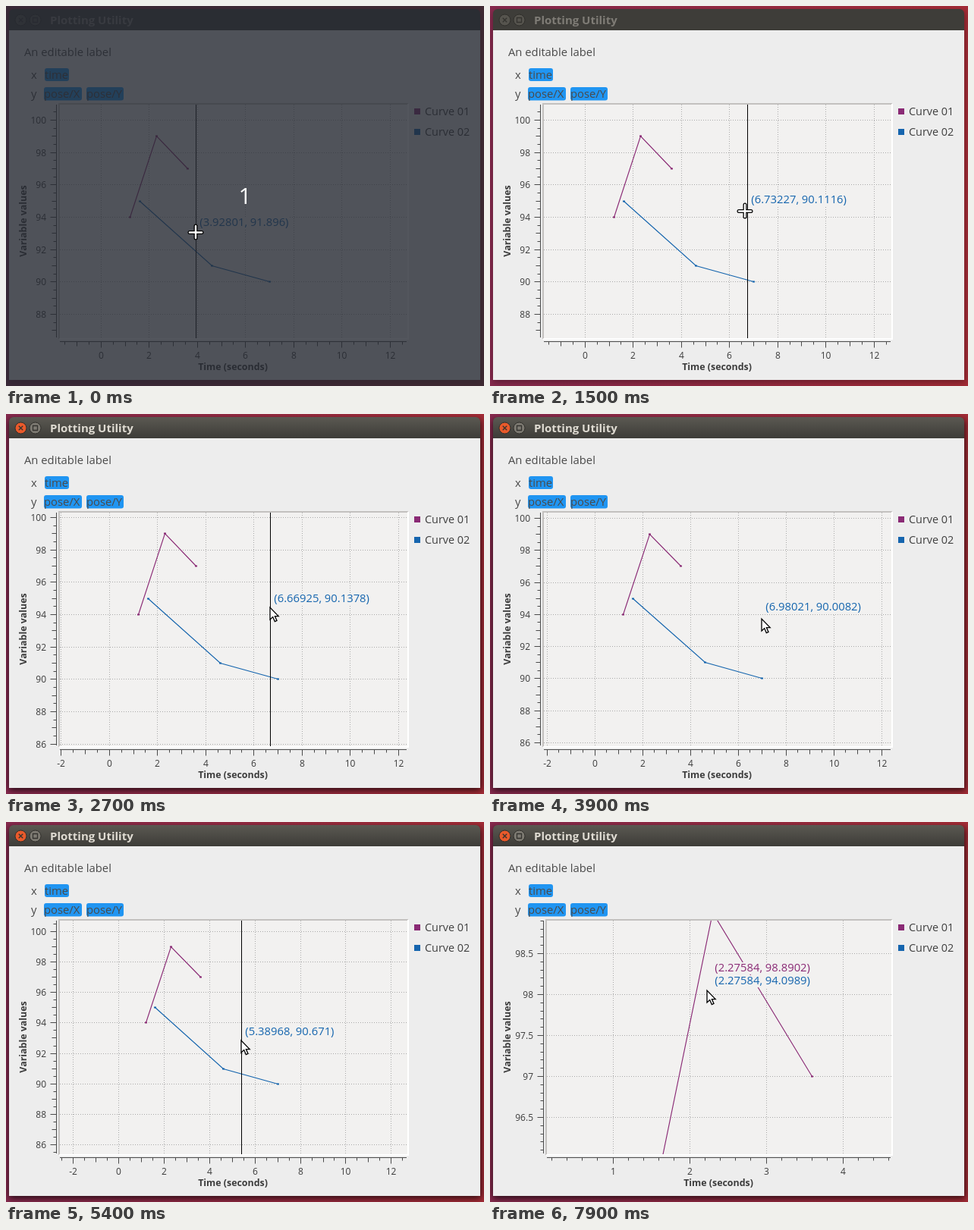
An HTML page with a canvas for the animation above (8000 ms loop, 630 by 501 pixels).

```html
<!DOCTYPE html>
<html lang="en">
<head>
<meta charset="utf-8">
<title>Plotting Utility</title>
<style>
  html, body { margin: 0; width: 100%; height: 100%; overflow: hidden; background: #8a2a4c; }
  svg, canvas { position: absolute; left: 0; top: 0; width: 630px; height: 501px; display: block; }
  text { font: 14.8px "Open Sans", "Noto Sans", sans-serif; fill: #4a4a4a; }
  .title { font-weight: 700; font-size: 15px; fill: #7f7c76; }
  .legend text { font-size: 14.4px; fill: #3f3f3f; }
  .axis { font-weight: 700; font-size: 12.4px; fill: #3c3c3c; text-anchor: middle; }
  .chip { fill: #2095f2; }
  .bar { fill: #3e3d39; }
  .shadow { opacity: .35; }
  .button { fill: #56544e; stroke: #2f2e2a; }
  .mark { fill: none; stroke: #34332f; stroke-width: 1.3; }
  .focused .title { fill: #dfdbd2; }
  .focused .bar { fill: url(#bar); }
  .focused .shadow { opacity: .75; }
  .focused .button { fill: #7d7a72; }
  .focused .close { fill: #e95a2b; }
</style>
</head>
<body>
<svg id="win" viewBox="0 0 630 501">
  <defs>
    <linearGradient id="desk">
      <stop offset="0" stop-color="#872a4e"/><stop offset="1" stop-color="#a42c36"/>
    </linearGradient>
    <linearGradient id="bar" x2="0" y2="1">
      <stop offset="0" stop-color="#5b5952"/><stop offset="1" stop-color="#3d3c38"/>
    </linearGradient>
    <filter id="blur"><feGaussianBlur stdDeviation="5"/></filter>
  </defs>
  <rect width="630" height="501" fill="url(#desk)"/>
  <rect class="shadow" x="4" y="8" width="622" height="488" filter="url(#blur)"/>
  <path class="bar" d="M4 32V10a6 6 0 0 1 6-6h609a6 6 0 0 1 6 6v22z"/>
  <rect x="4" y="32" width="621" height="461" fill="#ededed"/>
  <circle class="button close" cx="19.5" cy="18.5" r="7.5"/>
  <path class="mark" d="M16.8 15.8l5.4 5.4m0-5.4l-5.4 5.4"/>
  <circle class="button" cx="38.5" cy="18.5" r="7.5"/>
  <path class="mark" d="M35.5 15.5h6v6h-6z"/>
  <text class="title" x="58" y="24">Plotting Utility</text>
  <text x="24" y="66">An editable label</text>
  <rect class="chip" x="51" y="82" width="32" height="17" rx="3"/>
  <rect class="chip" x="50" y="107" width="50" height="17.5" rx="3"/>
  <rect class="chip" x="106" y="107" width="49" height="17.5" rx="3"/>
  <text x="33" y="96">x</text><text x="51" y="96">time</text>
  <text x="33" y="121">y</text><text x="50" y="121">pose/X</text><text x="106" y="121">pose/Y</text>
  <g class="legend">
    <rect x="538" y="135" width="8" height="8" fill="#8a2a75"/>
    <rect x="538" y="162" width="8" height="8" fill="#1565ae"/>
    <text x="552" y="144">Curve 01</text><text x="552" y="171">Curve 02</text>
  </g>
  <text class="axis" transform="translate(27 283.5) rotate(-90)">Variable values</text>
  <text class="axis" id="xTitle" x="299" y="480">Time (seconds)</text>
</svg>
<canvas id="plot" width="630" height="501"></canvas>
<script>
const LOOP = 8000, STEP = 100;
const TOP = 130, BOTTOM = 438, RIGHT = 529;
const FONT = '"Open Sans", "Noto Sans", sans-serif';
const win = document.getElementById('win');
const xTitle = document.getElementById('xTitle');
const ctx = document.getElementById('plot').getContext('2d');

const curves = [
  { color: '#8a2a75', pts: [[1.2, 94], [2.3, 99], [3.6, 97]] },
  { color: '#1565ae', pts: [[1.6, 95], [4.6, 91], [7, 90]] }
];

// time, pointer x, y, tracker x, y
const path = [
  [200, 250, 298, 250, 298], [800, 300, 283, 300, 283], [1300, 345, 268, 345, 268],
  [1500, 336, 270, 339, 268], [1700, 337, 269, 337, 269], [2700, 348, 255, 348, 256],
  [3000, 348, 255, 348, 256], [3100, 358, 270, 358, 267], [5100, 358, 270, 358, 267],
  [5200, 351, 273, 351, 273], [5400, 310, 288, 310, 289], [6000, 228, 205, 230, 205],
  [6300, 80, 152, 80, 152], [6400, 95, 147, 90, 147], [6900, 153, 166, 153, 166],
  [7200, 178, 206, 178, 206], [7800, 287, 223, 287, 223], [7900, 286, 222, 291, 222]
];
const wheel = [[3100, 1], [3200, 1.1], [3400, 1.1], [3600, 1.3], [3900, 1],
  [4100, 1], [4500, .78], [5000, 1]];
const pan = [[1700, 0], [2700, 1]];

// Linear interpolation between rows of [time, ...values]
function at(keys, t) {
  const i = keys.findIndex(k => k[0] > t);
  if (i < 0) return keys[keys.length - 1].slice(1);
  if (i === 0) return keys[0].slice(1);
  const a = keys[i - 1], b = keys[i], f = (t - a[0]) / (b[0] - a[0]);
  return a.slice(1).map((v, n) => v + (b[n + 1] - v) * f);
}

// A view maps value 0 on x and value 100 on y to pixels
const view = (px, value, sx, y100, sy) => ({ x0: px - value * sx, sx, y100, sy });

function viewAt(t) {
  if (t >= 7900) return view(291, 2.27584, 101, 11.5, 108);
  const p = at(pan, t)[0];
  const v = t >= 5000 ? view(310, 5.38968, 29.92, 144.5, 20.07)
    : t >= 3900 ? view(358, 6.98021, 31.5, 137.5, 21.14)
    : view(339 + Math.round(11 * p), 6.73227, 31.73743, 150.5 - Math.round(14 * p), 21.33);
  const k = at(wheel, t)[0];
  return { x0: 358 + (v.x0 - 358) * k, sx: v.sx * k, y100: 272 + (v.y100 - 272) * k, sy: v.sy * k };
}

function scale(range) {
  const raw = range / 8, mag = 10 ** Math.floor(Math.log10(raw));
  const lead = [1, 2, 5, 10].find(n => n * mag >= raw);
  return { step: lead * mag, minors: lead === 2 ? 4 : 5 };
}

function eachTick(lo, hi, { step, minors }, draw) {
  const d = step / minors;
  for (let i = Math.ceil(lo / d); i * d <= hi; i++) {
    const major = i % minors === 0;
    const length = major ? 8 : minors === 4 && i % 2 === 0 ? 6 : 4;
    draw(+(i * d).toFixed(4), length, major);
  }
}

const snap = v => Math.floor(v) + .5;

function line(x1, y1, x2, y2) {
  ctx.beginPath();
  ctx.moveTo(x1, y1);
  ctx.lineTo(x2, y2);
  ctx.stroke();
}

function gridLine(...ends) {
  ctx.strokeStyle = '#a9a9a9';
  ctx.setLineDash([1, 2]);
  line(...ends);
  ctx.setLineDash([]);
  ctx.strokeStyle = '#4a4a4a';
}

function drawFrame(left) {
  ctx.fillStyle = '#f2f1f0';
  ctx.fillRect(left, TOP, RIGHT - left, BOTTOM - TOP);
  ctx.fillStyle = '#c3c1bf';
  ctx.fillRect(left - 1, TOP - 2, RIGHT - left + 2, 2);
  ctx.fillRect(left - 1, TOP - 2, 2, BOTTOM - TOP + 3);
  ctx.fillStyle = '#fff';
  ctx.fillRect(RIGHT, TOP - 1, 2, BOTTOM - TOP + 3);
  ctx.fillRect(left, BOTTOM, RIGHT - left + 2, 2);
}

function drawAxes(v, left, xs, ys, box) {
  ctx.lineWidth = 1;
  ctx.strokeStyle = '#4a4a4a';
  ctx.fillStyle = '#3c3c3c';
  ctx.font = '12px ' + FONT;
  const ax = left - 3.5, ay = 442.5;
  line(ax, TOP, ax, BOTTOM - 1);
  line(left + 1, ay, RIGHT - 1, ay);
  ctx.textAlign = 'right';
  eachTick(box.y1, box.y2, ys, (n, length, major) => {
    const y = snap(v.y100 + (100 - n) * v.sy);
    line(ax, y, ax - length, y);
    if (!major) return;
    ctx.fillText(n, left - 17, y + 4.5);
    gridLine(left + 1, y, RIGHT, y);
  });
  ctx.textAlign = 'center';
  eachTick(box.x1, box.x2, xs, (n, length, major) => {
    const x = snap(v.x0 + n * v.sx);
    line(x, ay, x, ay + length);
    if (!major) return;
    ctx.fillText(n, x, 465);
    gridLine(x, TOP, x, BOTTOM);
  });
  ctx.textAlign = 'left';
}

function drawCurves(v, left) {
  ctx.save();
  ctx.beginPath();
  ctx.rect(left, TOP, RIGHT - left, BOTTOM - TOP);
  ctx.clip();
  ctx.lineWidth = 1.15;
  for (const { color, pts } of curves) {
    ctx.strokeStyle = ctx.fillStyle = color;
    const px = pts.map(([x, y]) => [snap(v.x0 + x * v.sx), snap(v.y100 + (100 - y) * v.sy)]);
    ctx.beginPath();
    px.forEach(p => ctx.lineTo(...p));
    ctx.stroke();
    px.forEach(([x, y]) => ctx.fillRect(x - 1.5, y - 1, 3, 2));
  }
  ctx.restore();
}

function valueOn(pts, x) {
  const i = pts.findIndex((p, n) => n && x >= pts[n - 1][0] && x <= p[0]);
  if (i < 0) return null;
  const [ax, ay] = pts[i - 1], [bx, by] = pts[i];
  return ay + (by - ay) * (x - ax) / (bx - ax);
}

const digits = n => +n.toPrecision(6);

function drawLabels(v, x, y) {
  const value = (x - v.x0) / v.sx;
  const rows = curves.map(c => ({ color: c.color, y: valueOn(c.pts, value) })).filter(r => r.y !== null);
  ctx.font = '14.8px ' + FONT;
  rows.forEach((r, i) => {
    const text = `(${digits(value)}, ${digits(r.y)})`;
    const base = y - 8 - 17 * (rows.length - 1 - i);
    ctx.fillStyle = '#f2f1f0';
    ctx.fillRect(x + 5, base - 12, ctx.measureText(text).width, 16);
    ctx.fillStyle = r.color;
    ctx.fillText(text, x + 5.3, base);
  });
}

function drawCross(x, y) {
  for (const [color, width, arm] of [['#000', 5, 8], ['#fff', 2.4, 8]]) {
    ctx.strokeStyle = color;
    ctx.lineWidth = width;
    ctx.lineCap = 'round';
    line(x - arm, y + .5, x + arm, y + .5);
    line(x, y - arm, x, y + arm);
  }
  ctx.lineCap = 'butt';
}

function drawArrow(x, y) {
  ctx.beginPath();
  for (const [dx, dy] of [[0, 0], [0, 16], [3.7, 12.6], [6.3, 18.6], [9, 17.4], [6.4, 11.6], [11.2, 11.6]])
    ctx.lineTo(x + dx, y + dy);
  ctx.closePath();
  ctx.fillStyle = '#fff';
  ctx.strokeStyle = '#000';
  ctx.lineWidth = 1.3;
  ctx.fill();
  ctx.stroke();
}

function drawCountdown() {
  ctx.fillStyle = 'rgba(38, 41, 50, .79)';
  ctx.fillRect(0, 0, 630, 501);
  ctx.fillStyle = '#fff';
  ctx.font = '30px ' + FONT;
  ctx.textAlign = 'center';
  ctx.fillText('1', 315, 261);
  ctx.textAlign = 'left';
}

function render(t) {
  const v = viewAt(t);
  const [cx, cy, tx, ty] = at(path, t).map(Math.round);
  const ys = scale((BOTTOM - TOP) / v.sy), xs = scale(458 / v.sx);
  const left = ys.step < 1 ? 74 : 70;
  const box = {
    x1: (left + 1 - v.x0) / v.sx, x2: (RIGHT - 1 - v.x0) / v.sx,
    y1: 100 - (BOTTOM - 1 - v.y100) / v.sy, y2: 100 - (TOP - v.y100) / v.sy
  };
  win.classList.toggle('focused', t >= 1700);
  xTitle.setAttribute('x', (left + 528) / 2);

  ctx.clearRect(0, 0, 630, 501);
  drawFrame(left);
  drawAxes(v, left, xs, ys, box);
  drawCurves(v, left);
  drawLabels(v, tx, ty);
  ctx.strokeStyle = '#000';
  ctx.lineWidth = 1;
  const hoverLine = t < 3200 || (t >= 5200 && t < 6900);
  if (hoverLine) line(tx + .5, TOP, tx + .5, BOTTOM);
  if (t >= 7000 && t < 7900) ctx.strokeRect(153.5, 166.5, cx - 153, cy - 166);
  if (t < 200) drawCountdown();
  (t < 1700 ? drawCross : drawArrow)(cx, cy);
}

const start = performance.now();
function tick() {
  const t = (performance.now() - start) % LOOP;
  render(Math.floor(t / STEP) * STEP);
  requestAnimationFrame(tick);
}
tick();
</script>
</body>
</html>
```
